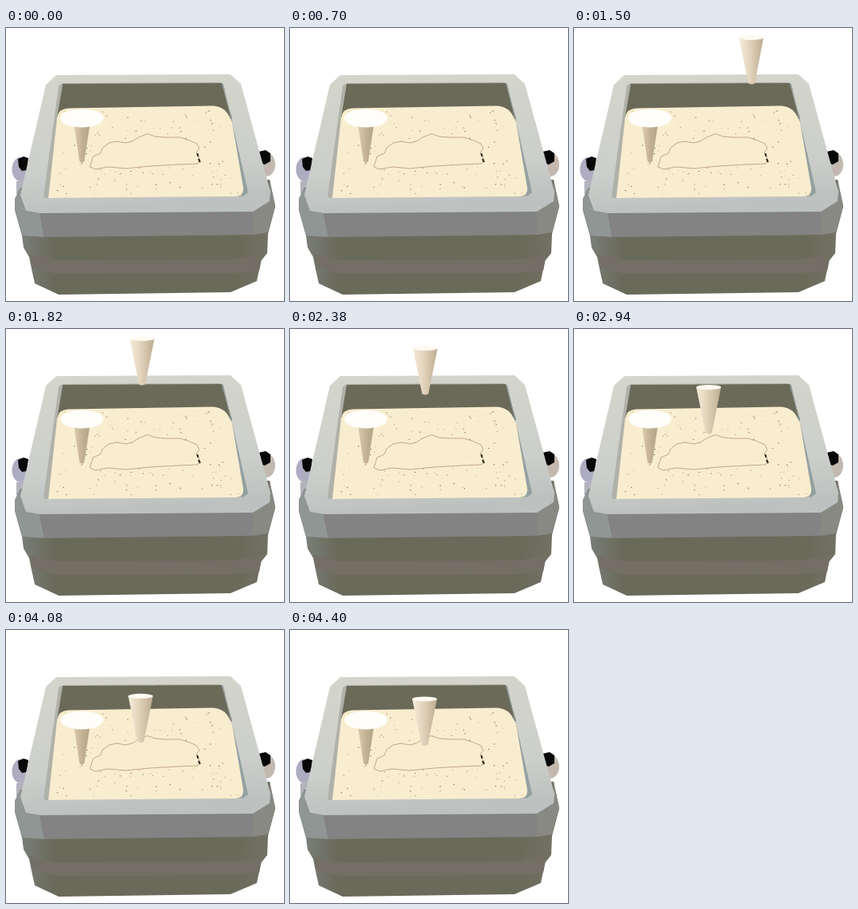
Recreate the animation shown at these times as an HTML page. Size 348x342 px, loop 4.86 s.

```html
<!DOCTYPE html>
<html lang="en">
<head>
<meta charset="utf-8">
<title>Sand mould</title>
<style>
  html, body { margin: 0; width: 100%; height: 100%; overflow: hidden; background: #fff; }
  svg { display: block; width: 100%; height: 100%; }
</style>
</head>
<body>
<svg viewBox="0 0 348 342">
  <defs>
    <linearGradient id="rim" x1="0" y1="0" x2=".15" y2="1">
      <stop offset="0" stop-color="#d5d5ca"/><stop offset=".7" stop-color="#cccfcb"/><stop offset="1" stop-color="#bdc2c0"/>
    </linearGradient>
    <linearGradient id="body">
      <stop offset="0" stop-color="#7c827c"/><stop offset=".15" stop-color="#6a6a5a"/><stop offset=".85" stop-color="#6a6a5a"/><stop offset="1" stop-color="#747266"/>
    </linearGradient>
    <linearGradient id="coneSide">
      <stop offset="0" stop-color="#f6ecda"/><stop offset=".4" stop-color="#e4d6bd"/><stop offset="1" stop-color="#bcab91"/>
    </linearGradient>
    <linearGradient id="sprueSide">
      <stop offset="0" stop-color="#dccdae"/><stop offset=".5" stop-color="#c3b293"/><stop offset="1" stop-color="#b1a488"/>
    </linearGradient>
  </defs>

  <!-- side pins -->
  <ellipse cx="18" cy="177" rx="10.500" ry="15" fill="#aeacc0"/>
  <ellipse cx="326" cy="171" rx="11" ry="15" fill="#c3b8ae"/>
  <path d="M13 192L22 190 22 212 13 208z" fill="#b4b3bd"/>
  <path d="M15 164l7-3 6 2-2 15-6 1-4-5zM316 155l9-2 6 4 0 10-7 4-7-2z" fill="#080808"/>

  <!-- body -->
  <path d="M18 200L11 214 11 228 20 260 22 275 29 287 32 302 36 320 66 334 281 331 314 317 319 292 327 282 328 258 337 224 330 190z" fill="url(#body)"/>
  <path d="M29 283L64 291 285 290 321 284 317 304 283 307 64 308 33 300z" fill="#746f65"/>
  <path d="M42 231L309 229 309 259 48 262z" fill="#838383"/>
  <path d="M19 200L11 214 11 227 20 260 48 262 42 232 25 229z" fill="#8f9694"/>
  <path d="M309 229L330 216 330 190 337 222 328 256 309 259z" fill="#898984"/>

  <!-- rim and cavity -->
  <path d="M50 71L63 59 281 58 294 70 331 205 330 217 309 230 42 232 25 229 18 209z" fill="url(#rim)"/>
  <path d="M66 72L71 69 268 68 272 70 303 206 297 211 49 213 47 211z" fill="#b0b1a9"/>
  <path d="M71 70L270 69 283 114 64 112z" fill="#6b6a59"/>
  <path d="M270 69L272 70 303 206 296 211 279 104z" fill="#93a0a1"/>

  <!-- sand -->
  <path d="M64 112Q66 101 78 100.500L258 97.500Q273 98 279 110L283 118 297 200Q298 210 287 211L53 213z" fill="#f9edcf"/>
  <g id="specks"></g>
  <path d="M105 174L109 161 118 157 121 150 129 144 139 142 150 144 158 142 166 137 177 132.500 187 136 200 137 218 137 230 141 239 145 242 151 238 156 243 165 240 170 215 171 180 173 150 176 128 174 112 177z"
        fill="#f9edcf" stroke="#c0aa84" stroke-linejoin="round"/>
  <path d="M239.500 157l1 4M241 164l2 4" stroke="#29251d" stroke-width="2"/>

  <!-- fixed funnel -->
  <path d="M85 121L105 121 98 167Q95 170 92 167z" fill="url(#sprueSide)"/>
  <ellipse cx="95" cy="113" rx="27" ry="11.500" fill="#fffefa"/>

  <!-- moving cone -->
  <g id="cone">
    <path d="M-15.500 0L-4 57Q0 60 4 57L15.500 0z" fill="url(#coneSide)"/>
    <ellipse rx="15.500" ry="3" fill="#fffaf2"/>
  </g>
</svg>
<script>
const LOOP = 4860, STEP = 40;
const cone = document.getElementById('cone');

// seeded grains spread over the sand's trapezoid
let seed = 7;
const rnd = () => (seed = (seed * 16807) % 2147483647) / 2147483647;
const tones = ['#7d7158', '#a8997a', '#c9b995'];
let grains = '';
for (let i = 0; i < 130; i++) {
  const v = rnd(), y = 104 + v * 104;
  const left = 72 - v * 14, right = 270 + v * 22;
  const x = left + rnd() * (right - left);
  grains += `<circle cx="${x.toFixed(1)}" cy="${y.toFixed(1)}" r=".7" fill="${tones[i % 3]}"/>`;
}
document.getElementById('specks').innerHTML = grains;

// eased progress between two times
function ease(t, from, to) {
  const p = Math.min(1, Math.max(0, (t - from) / (to - from)));
  return p * p * (3 - 2 * p);
}

function draw(now) {
  const t = Math.floor((now % LOOP - 20) / STEP) * STEP + 20;
  const slide = ease(t, 700, 1860), drop = ease(t, 2100, 3140);
  const x = 397.5 - 228 * slide - drop;
  const y = 12 + 67.5 * drop + 7 * ease(t, 3740, 4400);
  cone.setAttribute('transform', `translate(${x} ${y}) skewX(${3 * (1 - slide)})`);
  requestAnimationFrame(draw);
}
draw(0);
</script>
</body>
</html>
```
